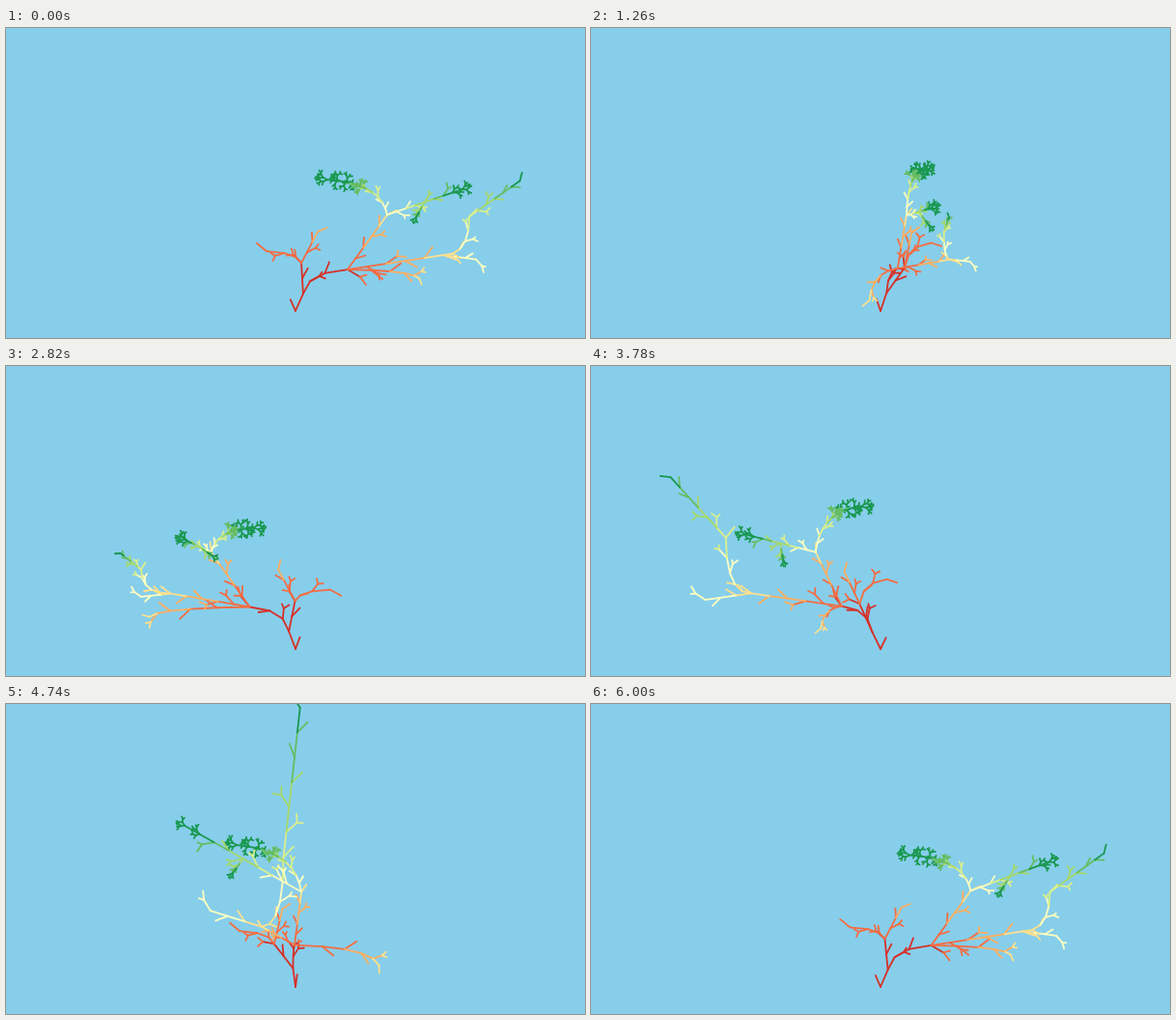
An HTML page with a canvas for the animation above (6060 ms loop, 600 px wide and 321 px high).

```html
<!DOCTYPE html>
<html>
<head>
<meta charset="utf-8">
<style>
html, body { margin: 0; width: 100%; height: 100%; overflow: hidden; background: #87ceeb; }
canvas { display: block; }
</style>
</head>
<body>
<canvas id="stage" width="600" height="321"></canvas>
<script>
const ctx = document.getElementById('stage').getContext('2d');
const LOOP = 6060, STEP = 60;
const COLORS = ['#d73027', '#f46d43', '#fdae61', '#fee08b', '#ffffbf',
                '#d9ef8b', '#a6d96a', '#66bd63', '#1a9850'];
const cosDeg = a => Math.cos(a * Math.PI / 180);
const sinDeg = a => Math.sin(a * Math.PI / 180);

// Each limb swings like a pendulum: the heading, in degrees clockwise from up, is
// lean +- swing, delayed by lag; snap makes it dwell at the ends. Its length pulses
// around reach by stretch, beat times a loop, longest at peak. hook bends the middle.
const limbs = [];
function limb(from, options) {
  const item = { from, at: 1, lean: 0, swing: 0, lag: 0, snap: 0.1, stretch: 0, beat: 1,
    peak: 0, hook: 0, parts: 3, tones: [0, 0.9], bush: 0, bushAt: 0.6, ...options };
  limbs.push(item);
  return item;
}

limb(null, { swing: -27, lag: 28, reach: 13, parts: 1 });
const trunk = limb(null, { swing: 27, lag: 28, reach: 19.5, parts: 1 });
const bend = limb(trunk, { swing: 62, lag: 8, reach: 36, stretch: 0.4, beat: 2, peak: 20,
  hook: 0.2 });

const shoulder = limb(trunk, { swing: 38, lag: 95, reach: 32, parts: 2 });
limb(shoulder, { swing: 72, lag: 150, snap: 3, reach: 38, hook: 0.2, tones: [1, 1.9] });
limb(shoulder, { swing: 28, lag: -3, snap: 2, reach: 37, tones: [1, 2] });

limb(bend, { lean: 180, swing: 85, lag: 150, snap: 2, reach: 70, stretch: 0.8, beat: 2,
  peak: 275, hook: -0.2, parts: 5, tones: [1, 3.4] });

const rise = limb(bend, { swing: 36, reach: 62, stretch: 0.12, beat: 2, parts: 5,
  tones: [1, 3.4] });
const knot = limb(bend, { swing: 82, lag: 30, snap: 3, reach: 66, stretch: 0.55, beat: 2,
  peak: 40, parts: 5, tones: [1, 3.4] });
limb(knot, { swing: 98, lag: 30, snap: 3, reach: 34, stretch: 0.5, peak: 270,
  tones: [3, 4.5] });
const whip = limb(knot, { lean: -7, swing: 44, lag: -22, reach: 46, stretch: 0.5, peak: 275,
  hook: -0.25, parts: 5, tones: [3, 5.4] });
limb(whip, { swing: 55, lag: 5, reach: 47, stretch: 1.2, peak: 285, parts: 6,
  tones: [5, 8.2] });

limb(rise, { swing: 60, lag: 157, snap: 2.5, reach: 62, stretch: 0.3, peak: 300, hook: 0.2,
  parts: 9, tones: [3.6, 8.9], bush: 4, bushAt: 0.55 });
const bough = limb(rise, { swing: 76, lag: 42, snap: 2, reach: 55, stretch: 0.95, peak: 295,
  parts: 8, tones: [3.4, 8.9], bush: 3, bushAt: 0.85 });
limb(bough, { at: 0.5, lean: 170, swing: 55, lag: 315, reach: 18, tones: [5, 8.9], bush: 2 });

let seed = 1;
function random() {
  seed = (seed * 16807) % 2147483647;
  return seed / 2147483647;
}

function line([x1, y1], [x2, y2], tone) {
  ctx.strokeStyle = COLORS[Math.min(8, Math.floor(tone))];
  ctx.beginPath();
  ctx.moveTo(x1, y1);
  ctx.lineTo(x2, y2);
  ctx.stroke();
}

function twig([x, y], heading, length, tone) {
  const end = [x + length * sinDeg(heading), y - length * cosDeg(heading)];
  line([x, y], end, tone);
  return end;
}

function sprig(from, heading, length, depth, tone) {
  for (const side of [-1, 1]) {
    const turn = heading + side * (20 + 35 * random());
    const end = twig(from, turn, length * (0.6 + 0.6 * random()), tone);
    if (depth > 1 && random() < 0.85) sprig(end, turn, length * 0.85, depth - 1, tone + 0.3);
  }
}

const squash = (value, snap) => Math.tanh(snap * value) / Math.tanh(snap);

function place(item, phase) {
  const { from, at, lean, swing, lag, snap, reach, stretch, beat, peak, hook } = item;
  const [x, y] = from ? pointOn(from.points, at) : [300, 293];
  const heading = lean + swing * squash(cosDeg(phase - lag), snap);
  const length = reach * Math.exp(stretch * cosDeg(beat * phase - peak));
  const dx = length * sinDeg(heading), dy = -length * cosDeg(heading);
  item.points = [[x, y], [x + dx * (0.5 - hook), y + dy * (0.5 + hook)], [x + dx, y + dy]];
}

// Quadratic through the three points.
function pointOn([a, b, c], u) {
  return [0, 1].map(k => a[k] * (1 - u) * (1 - 2 * u) + b[k] * 4 * u * (1 - u)
    + c[k] * u * (2 * u - 1));
}

function drawLimb({ points, parts, tones: [first, last], bush, bushAt }) {
  let from = points[0];
  for (let i = 1; i <= parts; i++) {
    const u = i / parts, to = pointOn(points, u);
    const tone = first + (last - first) * u;
    const dx = to[0] - from[0], dy = to[1] - from[1];
    const heading = Math.atan2(dx, -dy) * 180 / Math.PI, length = Math.hypot(dx, dy);
    line(from, to, tone);
    if (bush && u >= bushAt) {
      sprig(to, heading, 4, bush, tone);
    } else if (parts > 1) {
      const side = i % 2 ? 1 : -1, size = Math.min(15, 3 + length * 0.55);
      const turn = heading + side * (25 + 20 * random());
      const end = twig(to, turn, size, tone);
      if (random() < 0.4) sprig(end, turn, size * 0.6, 1, tone + 0.3);
    }
    from = to;
  }
}

function draw() {
  const time = Math.floor(performance.now() % LOOP / STEP) * STEP;
  ctx.fillStyle = '#87ceeb';
  ctx.fillRect(0, 0, 600, 321);
  ctx.lineWidth = 1.8;
  ctx.lineCap = 'round';
  limbs.forEach((item, i) => {
    seed = 7919 * (i + 3);
    place(item, 360 * time / LOOP);
    drawLimb(item);
  });
  requestAnimationFrame(draw);
}
draw();
</script>
</body>
</html>
```
